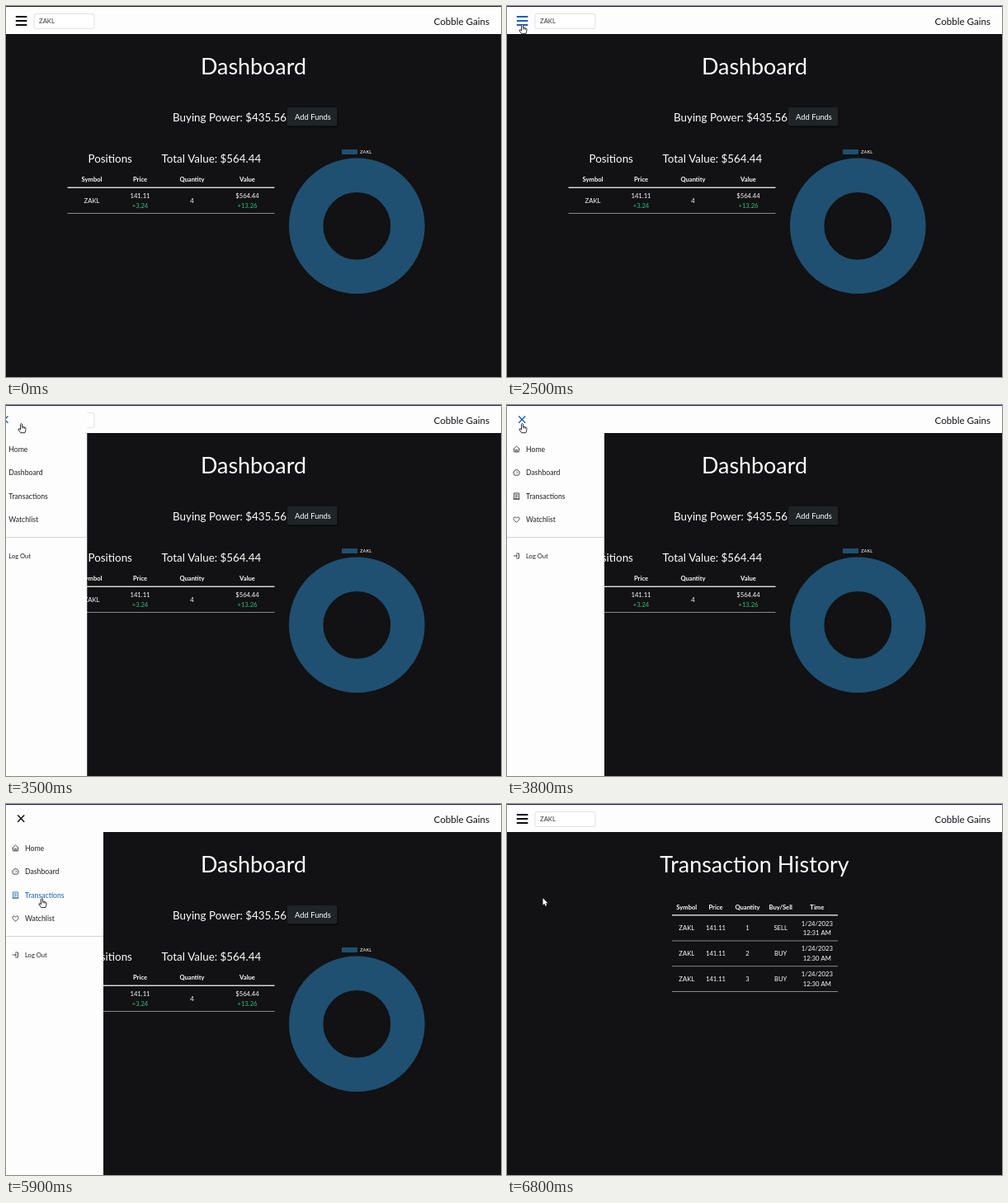
An HTML page with a canvas for the animation above (8.7 s loop, 600x450 px).

```html
<!DOCTYPE html>
<html lang="en">
<head>
<meta charset="utf-8">
<title>Trading dashboard</title>
<style>
html, body { margin: 0; width: 100%; height: 100%; overflow: hidden; background: #121113; }
canvas { display: block; width: 600px; height: 450px; }
</style>
</head>
<body>
<canvas id="stage"></canvas>
<script>
const W = 600, H = 450, LOOP = 8700, STEP = 100;
const SYMBOL = 'ZAKL', BRAND = 'Cobble Gains';
const BG = '#121113', PAPER = '#fdfdfe', INK = '#1d2024', BLUE = '#1c5fb8';
const GREEN = '#2fc27c', RING = '#1f5071', SIDE = 118;

const canvas = document.getElementById('stage');
const ctx = canvas.getContext('2d');
const dpr = window.devicePixelRatio || 1;
canvas.width = W * dpr;
canvas.height = H * dpr;

// Pointer path: time, x, y of the tip
const PATH = [
  [1100, 592, 330], [1200, 512, 222], [1300, 446, 136], [1400, 402, 92],
  [1500, 378.7, 75.7], [1700, 232, 54], [1900, 58, 40], [2000, 36, 30],
  [2200, 18.5, 22.3], [4100, 18.5, 22.3], [4300, 23, 46], [4500, 33, 86],
  [4600, 36.5, 93.8], [4800, 38.5, 101], [5000, 39.5, 108], [5600, 43.5, 114.2]
];

function pointer(t) {
  if (t < PATH[0][0]) return null;
  let i = 0;
  while (i < PATH.length - 1 && PATH[i + 1][0] <= t) i++;
  const a = PATH[i], b = PATH[i + 1];
  if (!b) return { x: a[1], y: a[2] };
  const k = (t - a[0]) / (b[0] - a[0]);
  return { x: a[1] + (b[1] - a[1]) * k, y: a[2] + (b[2] - a[2]) * k };
}

function slide(t, start) {
  const p = Math.min(1, Math.max(0, (t - start) / 500));
  return 1 - Math.pow(1 - p, 3.5);
}

// cy is the middle of the capitals
function text(s, x, cy, size, color = '#fff', align = 'center', weight = 400) {
  ctx.font = `${weight} ${size}px Lato, sans-serif`;
  ctx.textAlign = align;
  ctx.fillStyle = color;
  ctx.fillText(s, x, cy + size * 0.36);
}

function rect(x, y, w, h, color) {
  ctx.fillStyle = color;
  ctx.fillRect(x, y, w, h);
}

function box(x, y, w, h, r) {
  ctx.beginPath();
  ctx.roundRect(x, y, w, h, r);
}

function stroke(d, color, width) {
  ctx.strokeStyle = color;
  ctx.lineWidth = width;
  ctx.stroke(new Path2D(d));
}

function headings(names, xs, cy) {
  names.forEach((n, i) => text(n, xs[i], cy, 7.6, '#fff', 'center', 700));
}

function header(t) {
  rect(0, 0, W, 34, PAPER);
  const color = t >= 2200 && t < 3400 ? BLUE : '#0c0c0e';
  ctx.fillStyle = color;
  for (const y of [12, 17, 22]) {
    box(11.8, y, 13.6, 2.1, 0.6);
    ctx.fill();
  }
  box(34, 9.5, 73, 18, 2);
  ctx.fillStyle = '#fff';
  ctx.fill();
  ctx.strokeStyle = '#d8dade';
  ctx.lineWidth = 0.8;
  ctx.stroke();
  text(SYMBOL, 40, 18.6, 7.7, '#34373b', 'left');
  text(BRAND, 586, 18.8, 11.6, '#111316', 'right');
}

function dashboard() {
  text('Dashboard', 300, 73.6, 26.9);
  text('Buying Power: $435.56', 202, 134.7, 13.4, '#fff', 'left');
  box(341.5, 124, 61, 23, 1.5);
  ctx.fillStyle = '#060607';
  ctx.fill();
  box(341, 123, 60.5, 22.5, 1.5);
  ctx.fillStyle = '#1f2427';
  ctx.fill();
  text('Add Funds', 372, 135, 9.4);

  text('Positions', 99.5, 185, 13.4, '#fff', 'left');
  text('Total Value: $564.44', 188.5, 185, 13.4, '#fff', 'left');
  const xs = [104, 162.5, 225.5, 292.5];
  headings(['Symbol', 'Price', 'Quantity', 'Value'], xs, 210.5);
  rect(74.5, 219.6, 251, 1.3, '#f2f2f2');
  text(SYMBOL, xs[0], 236.3, 7.7);
  text('141.11', xs[1], 230.4, 7.7);
  text('+3.24', xs[1], 241.9, 7.7, GREEN);
  text('4', xs[2], 236.3, 7.7);
  text('$564.44', xs[3], 230.4, 7.7);
  text('+13.26', xs[3], 241.9, 7.7, GREEN);
  rect(74.5, 251, 251, 0.9, '#98989a');

  rect(407, 174, 19, 6, RING);
  text(SYMBOL, 429, 176.7, 5.8, '#fff', 'left');
  ctx.beginPath();
  ctx.arc(425.3, 266.8, 61.6, 0, Math.PI * 2);
  ctx.strokeStyle = RING;
  ctx.lineWidth = 41.4;
  ctx.stroke();
}

function history() {
  text('Transaction History', 300, 73.6, 26.9);
  const xs = [217.8, 253, 291.5, 331.7, 375.8];
  headings(['Symbol', 'Price', 'Quantity', 'Buy/Sell', 'Time'], xs, 125.3);
  rect(200, 134.2, 201, 1.3, '#f2f2f2');
  const rows = [['1', 'SELL', '12:31 AM'], ['2', 'BUY', '12:30 AM'], ['3', 'BUY', '12:30 AM']];
  rows.forEach(([count, side, time], i) => {
    const y = 150.7 + i * 30.8;
    [SYMBOL, '141.11', count, side].forEach((s, n) => text(s, xs[n], y, 7.7));
    text('1/24/2023', xs[4], y - 5.8, 7.7);
    text(time, xs[4], y + 5.8, 7.7);
    rect(200, y + 14.8, 201, 0.9, '#98989a');
  });
}

const MENU = [
  ['Home', 53.5, 'M-4 .2L0-3.6 4 .2M-2.9-.5V3.4H2.9V-.5M-.9 3.2V.9H.9V3.2'],
  ['Dashboard', 82, 'M-2.4 3.1A3.7 3.7 0 1 1 2.4 3.1ZM0 .7L1.6-.9M-2.3 .3H-1.8M0-2.1V-1.6M1.9 .5H2.3'],
  ['Transactions', 110.5, 'M-3-3.6H3V3.6H-3ZM-1.6-1.7H1.6M-1.6 0H1.6M-1.6 1.8H.3M-4 3.6H4'],
  ['Watchlist', 139, 'M0 3.2C-6.4-1-2.7-4.9 0-2C2.7-4.9 6.4-1 0 3.2Z']
];
const EXIT = 'M-.2-3H3V3H-.2M-3.6 0H1M-.7-1.6L1 0L-.7 1.6';

function icon(d, y, color) {
  ctx.save();
  ctx.translate(11.5, y);
  stroke(d, color, 0.8);
  ctx.restore();
}

function sidebar(t, tip) {
  const offset = t < 5900 ? slide(t, 3300) - 1 : -slide(t, 5900);
  if (t < 3400 || offset <= -1) return;
  ctx.save();
  ctx.translate(offset * SIDE, 0);
  rect(0, 0, SIDE, H, PAPER);
  stroke('M14.2 13.4L22.2 21.8M22.2 13.4L14.2 21.8', t < 4200 ? BLUE : '#0c0c0e', 1.4);
  for (const [name, y, d] of MENU) {
    const color = Math.abs(tip.y - y) < 14.25 ? BLUE : INK;
    icon(d, y, color);
    text(name, 23, y, 8.7, color, 'left');
  }
  rect(0, 160, SIDE, 1, '#d3d4d6');
  icon(EXIT, 183, INK);
  text('Log Out', 23, 183, 7.6, INK, 'left');
  ctx.restore();
}

const ARROW = new Path2D('M0 0V8.3L1.9 6.6L3.2 9.5L4.6 8.9L3.4 6.1H5.9Z');
const HAND = new Path2D('M-1 .9Q0-.6 1 .9V4L4.7 4.9Q5.6 5.2 5.5 6.2L5.3 8.4L4.4 11.4H-.8L-3.5 7.7Q-3.8 6.2-2.4 6.5L-1 7.7Z');

function cursor(t, tip) {
  const hand = t >= 2200 && t < 6200;
  const shape = hand ? HAND : ARROW;
  ctx.save();
  ctx.translate(tip.x, tip.y);
  ctx.lineJoin = 'round';
  ctx.strokeStyle = '#17171a';
  ctx.lineWidth = hand ? 0.9 : 1.2;
  ctx.fillStyle = '#fff';
  if (hand) {
    ctx.fill(shape);
    ctx.stroke(shape);
    stroke('M1 4V6.2M2.6 4.5V6.4M4.1 4.9V6.6', '#17171a', 0.6);
  } else {
    ctx.stroke(shape);
    ctx.fill(shape);
  }
  ctx.restore();
}

function draw(t) {
  ctx.setTransform(dpr, 0, 0, dpr, 0, 0);
  rect(0, 0, W, H, BG);
  if (t < 6000) dashboard(); else history();
  header(t);
  const tip = pointer(t);
  if (tip) sidebar(t, tip);
  rect(0, 0, W, 1, t < 2400 ? '#1b1b20' : '#1d1a4a');
  if (tip) cursor(t, tip);
}

const began = performance.now();
function tick() {
  const t = (performance.now() - began) % LOOP;
  draw(Math.floor(t / STEP) * STEP);
  requestAnimationFrame(tick);
}
tick();
</script>
</body>
</html>
```
